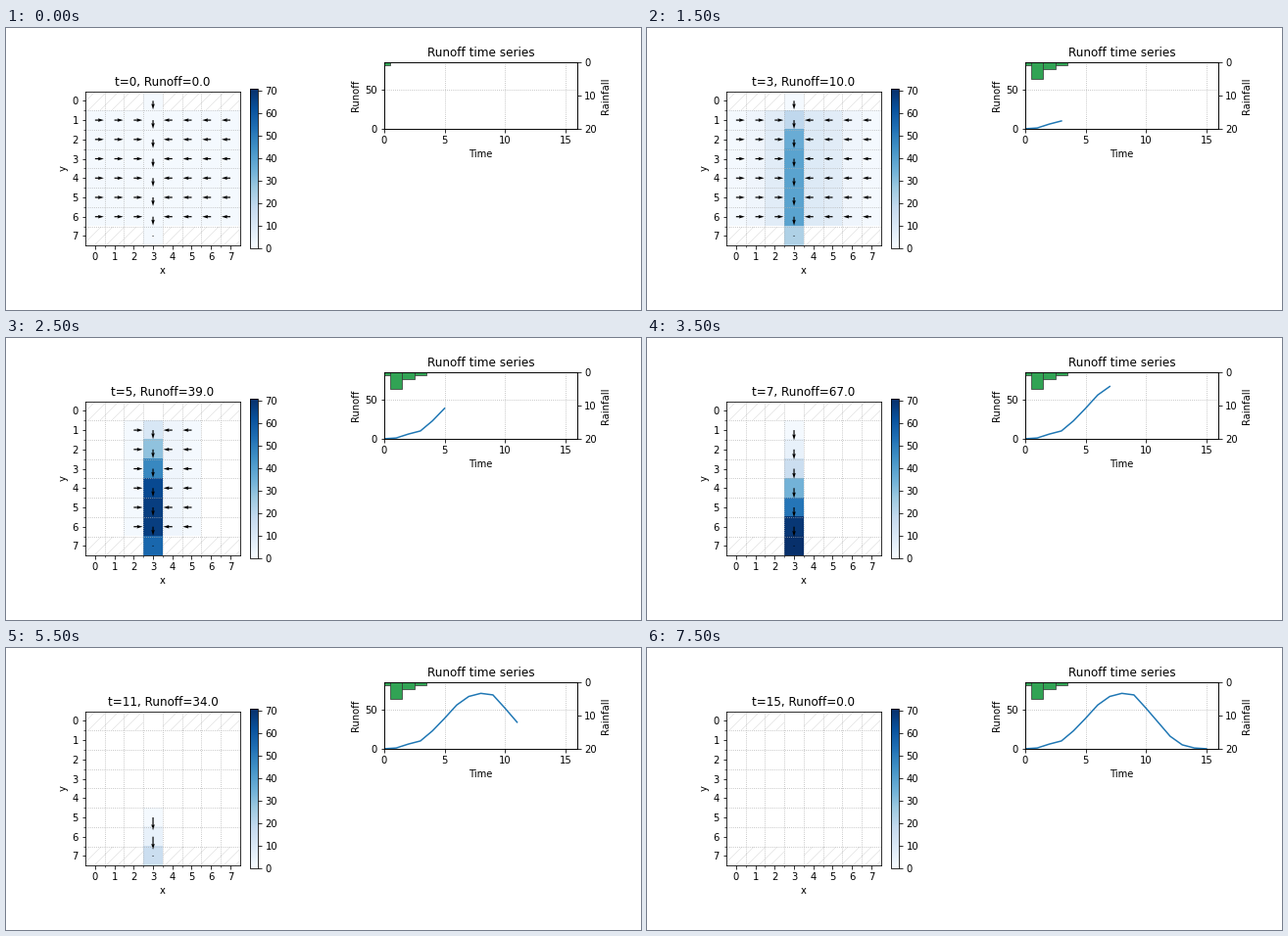
Recreate the animation shown at these times as a matplotlib script. Size 648 by 288 pixels, loop 8 s.

```python
import numpy as np
import matplotlib.pyplot as plt
from matplotlib.animation import FuncAnimation
from matplotlib.cm import ScalarMappable
from matplotlib.colors import Normalize
from matplotlib.patches import Rectangle

WIDTH, HEIGHT, DPI = 648, 288, 72
SIZE, CHANNEL, STEPS = 8, 3, 16
RAIN = np.array([1, 5, 2, 1] + [0] * (STEPS - 4))

plt.rcParams.update({
    "font.family": "DejaVu Sans", "font.size": 10,
    "grid.linestyle": ":", "hatch.linewidth": 0.5,
})


def simulate():
    """Move all water one cell per step: sideways to the channel, then down."""
    basin = np.zeros((SIZE, SIZE))
    basin[1:-1] = 1
    basin[:, CHANNEL] = 1
    water = np.zeros_like(basin)
    states, runoff = [], []
    for rain in RAIN:
        runoff.append(water[-1, CHANNEL])
        moved = np.zeros_like(water)
        moved[:, 1:CHANNEL + 1] += water[:, :CHANNEL]
        moved[:, CHANNEL:-1] += water[:, CHANNEL + 1:]
        moved[1:, CHANNEL] += water[:-1, CHANNEL]
        water = moved + rain * basin
        states.append(water)
    return states, np.array(runoff)


def add_axes(left, top, right, bottom):
    return fig.add_axes([left / WIDTH, 1 - bottom / HEIGHT,
                         (right - left) / WIDTH, (bottom - top) / HEIGHT])


states, runoff = simulate()
peak = runoff.max()
norm = Normalize(0, peak)

flow_u = np.tile(np.sign(CHANNEL - np.arange(SIZE)), (SIZE, 1)).astype(float)
flow_v = np.zeros((SIZE, SIZE))
flow_v[:-1, CHANNEL] = -1

fig = plt.figure(figsize=(WIDTH / DPI, HEIGHT / DPI), dpi=DPI, facecolor="white")

# Water map
map_ax = add_axes(81, 64.5, 238.8, 222.3)
image = map_ax.imshow(np.ma.masked_all((SIZE, SIZE)), cmap="Blues", norm=norm,
                      aspect="auto", interpolation="nearest")
for row in (0, SIZE - 1):
    for start, stop in ((0, CHANNEL), (CHANNEL + 1, SIZE)):
        map_ax.add_patch(Rectangle((start - 0.5, row - 0.5), stop - start, 1,
                                   fill=False, lw=0, hatch="//", edgecolor="0.85"))
map_ax.set(xlabel="x", ylabel="y", xticks=range(SIZE), yticks=range(SIZE))
edges = np.arange(0.5, SIZE - 1)
map_ax.set_xticks(edges, minor=True)
map_ax.set_yticks(edges, minor=True)
map_ax.grid(which="minor")
title = map_ax.set_title("")

bar_ax = add_axes(249.3, 62, 257.4, 225)
fig.colorbar(ScalarMappable(norm, "Blues"), cax=bar_ax, ticks=range(0, 71, 10))

# Runoff and rainfall over time
run_ax = add_axes(385.9, 35, 583.2, 102.9)
line, = run_ax.plot([], [])
run_ax.set(title="Runoff time series", xlabel="Time", ylabel="Runoff",
           xlim=(0, STEPS), ylim=(0, 1.2 * peak),
           xticks=range(0, STEPS, 5), yticks=[0, 50])
run_ax.grid()
rain_ax = run_ax.twinx()
bars = rain_ax.bar(range(STEPS), RAIN, width=1, color="#31a354",
                   edgecolor="0.2", lw=0.7)
rain_ax.set(ylabel="Rainfall", ylim=(20, 0), yticks=[0, 10, 20])

arrows = []


def update(t):
    water = states[t]
    wet = water > 0
    image.set_data(np.ma.masked_where(~wet, water))
    title.set_text(f"t={t}, Runoff={runoff[t]:.1f}")
    while arrows:
        arrows.pop().remove()
    u, v = flow_u[wet], flow_v[wet]
    if np.any(u) or np.any(v):
        rows, cols = np.nonzero(wet)
        arrows.append(map_ax.quiver(cols, rows, u, v))
    line.set_data(np.arange(t + 1), runoff[:t + 1])
    for i, bar in enumerate(bars):
        bar.set_visible(i <= t and RAIN[i] > 0)


anim = FuncAnimation(fig, update, frames=STEPS, interval=500,
                     init_func=lambda: update(0), repeat=True)
plt.show()
```
